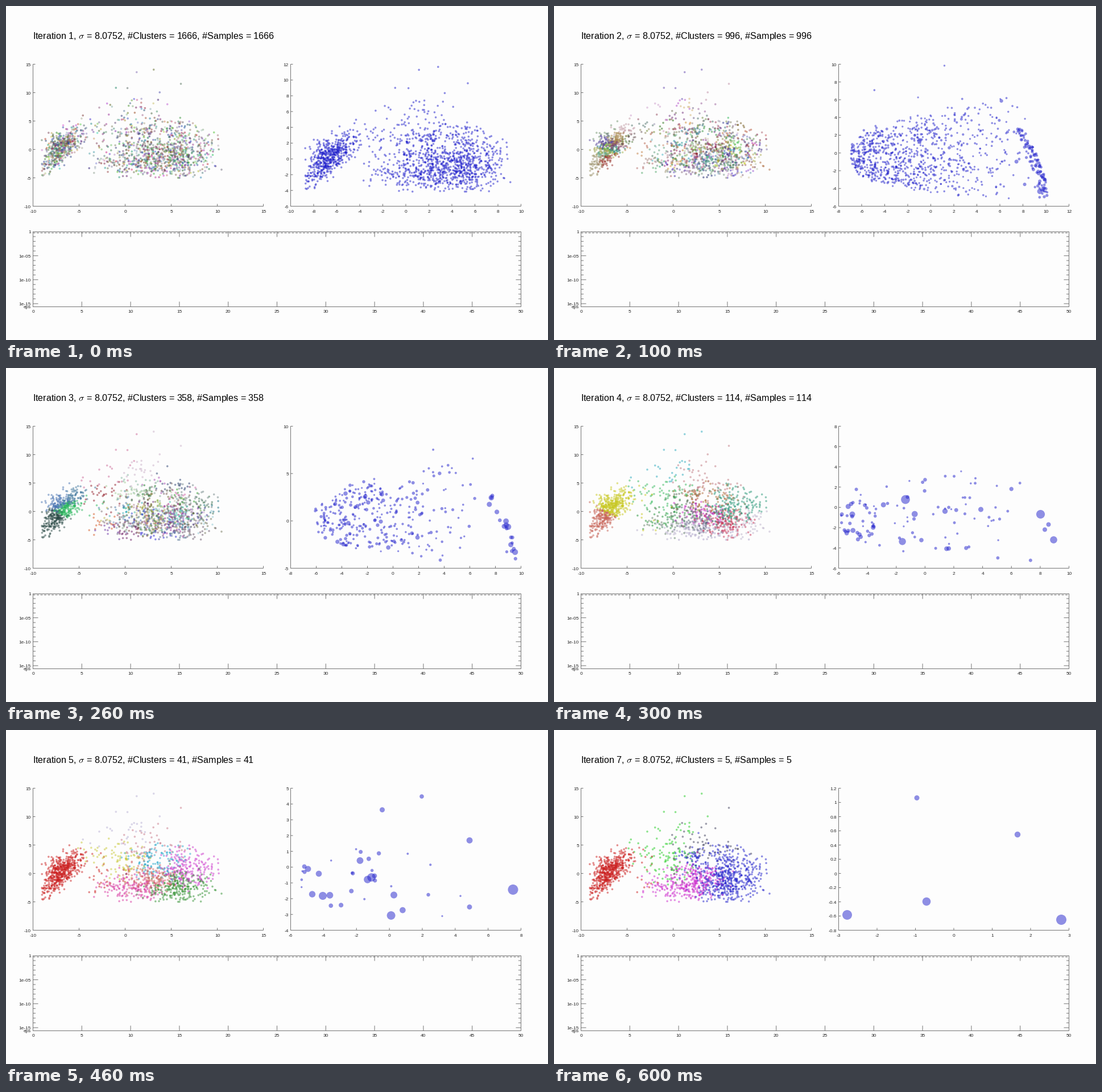
Animation, 953 px wide and 588 px high, one loop 0.7 s. Source, as a matplotlib script:

```python
import numpy as np
import matplotlib.pyplot as plt
from matplotlib.animation import FuncAnimation
from matplotlib.collections import LineCollection
from matplotlib.colors import hsv_to_rgb, to_rgb

W, H, DPI = 953, 588, 64
PT = 72 / DPI                      # points per pixel
INK, LINE, BLUE = "#262626", "#747474", "#2020cc"

plt.rcParams["font.family"] = "Liberation Sans"
plt.rcParams["mathtext.fontset"] = "cm"

rng = np.random.default_rng(11)
fig = plt.figure(figsize=(W / DPI, H / DPI), dpi=DPI, facecolor="#fdfdfd")
ax = fig.add_axes([0, 0, 1, 1])
ax.set(xlim=(0, W), ylim=(H, 0))
ax.axis("off")


# ---------- drawing helpers ----------
def label(x, y, s, ha="center", size=8.3, color=INK):
    return ax.text(x, y, s, ha=ha, va="baseline", fontsize=size * PT, color=color)


def lines(segs):
    art = LineCollection(segs, colors=LINE, linewidths=PT)
    art.set_snap(False)
    return ax.add_collection(art)


def dots(x, y, r, color):
    size = (2 * np.asarray(r) * PT) ** 2
    return ax.scatter(x, y, s=size, c=color, alpha=0.5, linewidths=0)


def to_px(v, lo, hi, a, b):
    return a + (np.asarray(v) - lo) / (hi - lo) * (b - a)


def steps(lo, hi, step):
    return [round(lo + k * step, 6) for k in range(round((hi - lo) / step) + 1)]


def panel(left, right, xs, ys, top=102.5, bottom=352.5, tick=4):
    """Open axes with inward ticks; xs and ys are (low, high, step)."""
    segs = [[(left, top), (left, bottom)], [(left, bottom), (right, bottom)]]
    out = []
    for v in steps(*xs):
        x = to_px(v, xs[0], xs[1], left, right)
        segs.append([(x, bottom), (x, bottom - tick)])
        out.append(label(x, bottom + 11, f"{v:g}"))
    for v in steps(*ys):
        y = to_px(v, ys[0], ys[1], bottom, top)
        segs.append([(left, y), (left + tick, y)])
        out.append(label(left - 3.5, y + 3, f"{v:g}", "right"))
    return out + [lines(segs)]


def error_plot(left=47.5, right=905.5, top=397.5, bottom=529.5):
    segs = [[(left, top), (right, top)], [(left, bottom), (right, bottom)],
            [(left, top), (left, bottom)], [(right, top), (right, bottom)]]
    for v in range(0, 51, 5):
        x = to_px(v, 0, 50, left, right)
        segs += [[(x, top), (x, top + 9)], [(x, bottom), (x, bottom - 9)]]
        label(x, bottom + 10.5, str(v))
    for e in range(16):
        y = to_px(e, 0, 15.65, top, bottom)
        n = 4.5 if e % 5 else 9
        segs += [[(left, y), (left + n, y)], [(right, y), (right - n, y)]]
        if e % 5 == 0:
            label(left - 3.5, y + 3, f"1e-{e:02d}" if e else "1", "right")
    label(left - 3.5, bottom + 2.5, "eps", "right")
    lines(segs)
    ax.plot([left, right], [top + 2, top + 2], color=LINE, lw=PT,
            dashes=(4, 2.5), snap=False)


# ---------- point cloud ----------
PEAKS = [(1.25, 13.6), (3.1, 14.05), (6.05, 11.55),
         (.25, 10.8), (3.75, 10.05), (-1, 10.85)]


def make_cloud(total=1666):
    n = 540
    y = rng.normal(.3, 1.95, n)
    y = np.where(y < -4.8, -9.6 - y, y)
    x = -7 + .4 * y + (.75 + .06 * y) * rng.normal(0, 1, n)
    west = np.c_[np.maximum(x, -9.1 + .1 * rng.random(n)), y]

    x = np.r_[rng.normal(5.8, 2.1, 560), rng.normal(1.6, 2.7, 560),
              rng.normal(2.3, 2.8, 180)]
    y = np.r_[rng.normal(-.6, 2.2, 560), -5.3 + rng.gamma(3, 1.45, 560),
              2.5 + rng.exponential(2.2, 180)]
    y = np.where(y < -5, -10 - y, y)
    roof = 8.2 - np.where(x > 1.5, .58, .4) * abs(x - 1.5)
    keep = (y < roof) & (x > -4.2) & (x < 10.6)
    east = np.c_[x, y][keep]
    rng.shuffle(east)

    tail = np.c_[rng.normal(.3, 2, 18), rng.uniform(7, 9.8, 18)]
    pts = np.r_[west, PEAKS, tail, east][:total]
    rng.shuffle(pts)
    return pts


# ---------- colour groups ----------
ZONES = np.array([(-5, .6), (-8, -2.4), (-.8, 8.5), (-1.3, 2.5), (.8, -3),
                  (2.5, -.5), (3.4, 6), (5.8, -2.4), (6.8, 1), (3.6, 2.3)])
PALETTES = [
    "", "", "28b85c 284844",
    "c8c820 c86458 28a8bc 34b85c b8b0cc c828c4 c07880 c83458 289878 b06c38",
    "cc2020 cc2020 b8b0d4 c8c834 d834a0 d46868 c87888 309030 cc38cc 28a8cc",
    "cc2020 cc2020 cc50cc 28c8c8 287828 8c5890 c8c83c 2424cc 34cc34 c89c70",
    "cc2020 cc2020 20cc20 20cc20 cc28cc cc28cc 3c3c58 2020cc 2020cc 2020cc"]
EXTRA = [(0, 0), (370, 14), (85, 2), (6, 0), (0, 0), (0, 0), (0, 0)]


def tint(n):
    return hsv_to_rgb(np.c_[rng.random(n), rng.uniform(.1, .85, n),
                            rng.uniform(.4, .85, n)])


def group_colors(pts, stage):
    """Colour by nearest zone or random seed, with blurred borders."""
    if stage == 0:
        return tint(len(pts))
    named = [to_rgb("#" + c) for c in PALETTES[stage].split()]
    is_west = pts[:, 0] < -4.5
    picks = [rng.permutation(np.flatnonzero(m))[:n]
             for m, n in zip((~is_west, is_west), EXTRA[stage])]
    seeds = np.r_[ZONES[:len(named)], pts[np.concatenate(picks)]]
    colors = np.r_[np.reshape(named, (-1, 3)), tint(len(seeds) - len(named))]
    blur = np.where(is_west, .3, min(.4 * stage, 1.1))[:, None]
    p = pts + blur * rng.normal(0, 1, pts.shape)
    d = ((p[:, None] - seeds[None]) ** 2).sum(2)
    return colors[d.argmin(1)]


# ---------- merged samples on the right (pixel x, y, radius) ----------
def fan(n, x0, x1, grow):
    """Rounded wedge that opens to the right; radii spread with grow."""
    u = rng.beta(1.15, 2, n)
    top = 252 - 100 * u ** .5
    low = 264 + 82 * u ** .28
    y = top + (low - top) * rng.beta(1.4, 1.25, n)
    y -= (rng.random(n) < .05) * rng.exponential(22, n)
    r = 1.6 + rng.gamma(1.3, grow, n)
    return np.c_[x0 + (x1 - x0) * u, np.maximum(y, 105), r]


def arc(n, x_end, spread, r0, grow):
    """Dense bubbles along the curved right flank."""
    t = rng.beta(1.1, 1.2, n)
    x = x_end - 45 * (1 - t) ** 1.6 - rng.exponential(spread, n)
    return np.c_[x, 216 + 122 * t, r0 + rng.gamma(2, grow, n)]


def first_samples(pts):
    x = .92 * pts[:, 0] - .005 * pts[:, 0] ** 2
    y = .83 * pts[:, 1]
    return np.c_[to_px(x, -10, 10, 500.5, 905.5), to_px(y, -6, 12, 352.5, 102.5),
                 np.full(len(pts), 1.8)]


cloud = make_cloud()
samples = [
    first_samples(cloud),
    np.r_[fan(886, 522, 835, .16), arc(110, 870, 9, 1.7, .35)],
    np.r_[fan(338, 543, 840, .45), arc(20, 898, 7, 2.2, .8)],
    np.r_[fan(109, 503, 845, 1), [(855.5, 257.5, 7.6), (878.5, 302.5, 6.3),
          (869.5, 275.5, 4), (863, 284.5, 4), (750.5, 249, 4.5)]],
    np.r_[fan(35, 518, 870, 1.2), [(891.5, 281, 9), (557, 292, 7), (682, 290.5, 6),
          (550, 253, 5.3), (661.5, 140.5, 4.5), (731, 117, 3.8)]],
    np.r_[fan(11, 548, 860, 1.3), [(855.5, 302, 8.6), (561, 310.5, 6.7),
          (550, 259, 6.4), (681, 274, 6.1), (603, 274, 5.7), (763, 226.5, 4.9),
          (636, 122, 4.4), (757, 124.5, 3.7)]],
    np.array([(638, 119.5, 4.5), (815, 184, 5.2), (655, 302, 7.3),
              (515.5, 325.5, 8.5), (892, 334, 9)])]

RANGES = [((-10, 10, 2), (-6, 12, 2)), ((-8, 12, 2), (-6, 10, 2)),
          ((-8, 10, 2), (-5, 10, 5)), ((-6, 10, 2), (-6, 8, 2)),
          ((-6, 8, 2), (-4, 5, 1)), ((-6, 8, 2), (-2, 3, .5)),
          ((-3, 3, 1), (-.8, 1.2, .2))]


def build(stage):
    n = len(samples[stage])
    title = (rf"Iteration {stage + 1}, $\sigma$ = 8.0752, "
             f"#Clusters = {n}, #Samples = {n}")
    x = to_px(cloud[:, 0], -10, 15, 47.5, 452.5)
    y = to_px(cloud[:, 1], -10, 15, 352.5, 102.5)
    group = [label(47, 57.8, title, "left", 16.15, "black"),
             dots(x, y, 1.8, group_colors(cloud, stage)),
             dots(*samples[stage].T, BLUE)]
    return group + panel(500.5, 905.5, *RANGES[stage])


panel(47.5, 452.5, (-10, 15, 5), (-10, 15, 5))
error_plot()
stages = [build(k) for k in range(len(samples))]


def update(i):
    for k, group in enumerate(stages):
        for artist in group:
            artist.set_visible(k == i)
    return []


update(0)
anim = FuncAnimation(fig, update, frames=len(stages), interval=100, repeat=True,
                     repeat_delay=0, blit=False)
plt.show()
```
